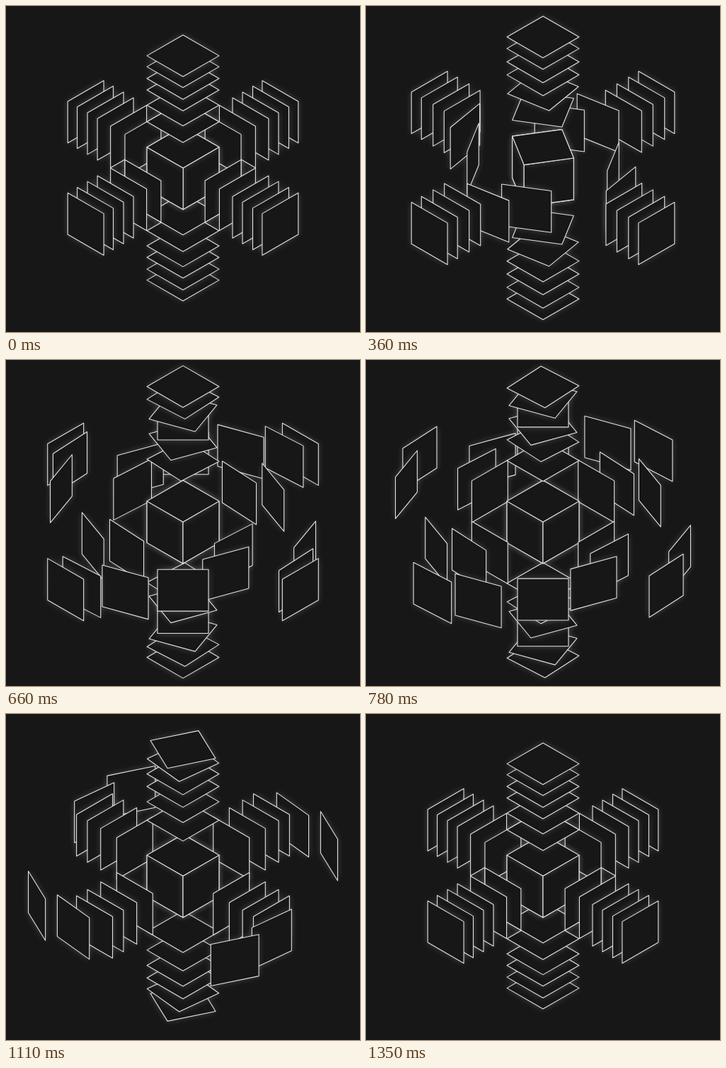
Recreate the animation shown at these times as an HTML page with a canvas. Size 500 px wide and 461 px high, loop 1380 ms.

```html
<!DOCTYPE html>
<html lang="en">
<head>
<meta charset="utf-8">
<title>Exploded cube</title>
<style>
  html, body { margin: 0; width: 100%; height: 100%; overflow: hidden; background: #171717; }
  canvas { display: block; }
</style>
</head>
<body>
<canvas id="stage" width="500" height="461"></canvas>
<script>
const ctx = document.getElementById('stage').getContext('2d');
const LOOP = 1380, STEP = 30;                // ms
const TURN = 630, STAGGER = 120;             // ms per quarter turn, delay per shell
const HALF = 36;                             // half the side of a panel
const CX = 250, CY = 229;
const TILT = Math.asin(1 / Math.sqrt(3));    // isometric view
const SIN = Math.sin(TILT), COS = Math.cos(TILT);
const CORNERS = [[-1, -1], [1, -1], [1, 1], [-1, 1]];

// Rest distance and outward travel of each shell, from the core out
const SHELLS = [
  [36, 0], [78.7, 28.1], [107.2, 33.6], [133.4, 34.1],
  [153.1, 37.3], [173.4, 40.9], [192.3, 42.2]
];

// x to the right, y up, z towards the viewer
const project = ([x, y, z]) => [CX + x, CY + z * SIN - y * COS];

function quarterTurn(t, i) {
  const p = Math.min(1, Math.max(0, (t - i * STAGGER) / TURN));
  return Math.PI / 4 * (1 - Math.cos(Math.PI * p));
}

const spread = t => 1 - Math.abs(1 - 2 * t / LOOP) ** 2.17;

// The panels of one shell: four sides, top and bottom
function shellPanels(dist, angle) {
  const panels = [];
  for (let k = 0; k < 4; k++) {
    const a = angle + Math.PI / 4 + k * Math.PI / 2;
    const s = Math.sin(a), c = Math.cos(a);
    if (Math.abs(c) < 0.005) continue;       // edge-on, invisible
    panels.push({
      front: c > 0,
      points: CORNERS.map(([u, v]) =>
        project([dist * s + u * HALF * c, v * HALF, dist * c - u * HALF * s]))
    });
  }
  const s = Math.sin(angle + Math.PI / 4), c = Math.cos(angle + Math.PI / 4);
  for (const side of [1, -1]) {
    panels.push({
      front: side > 0,
      points: CORNERS.map(([u, v]) =>
        project([HALF * (u * c + v * s), side * dist, HALF * (v * c - u * s)]))
    });
  }
  return panels;
}

function drawPanel({ points }) {
  ctx.beginPath();
  for (const [x, y] of points) ctx.lineTo(x, y);
  ctx.closePath();
  ctx.shadowColor = 'rgba(255,255,255,.2)';
  ctx.shadowBlur = 10;
  ctx.fill();
  ctx.shadowColor = 'transparent';
  ctx.stroke();
}

function draw(t) {
  ctx.fillStyle = '#171717';
  ctx.fillRect(0, 0, 500, 461);
  ctx.strokeStyle = '#e2e2e2';
  ctx.lineWidth = 1.1;
  ctx.lineJoin = 'round';
  const open = spread(t);
  const shells = SHELLS.map(([rest, travel], i) =>
    shellPanels(rest + travel * open, quarterTurn(t, i)));
  // Rear panels from the outside in, then front panels from the inside out
  for (const shell of [...shells].reverse()) shell.filter(p => !p.front).forEach(drawPanel);
  for (const shell of shells) shell.filter(p => p.front).forEach(drawPanel);
}

const start = performance.now();
function tick() {
  const t = (performance.now() - start) % LOOP;
  draw((Math.floor(t / STEP) + 0.5) * STEP);  // each step shows its middle
  requestAnimationFrame(tick);
}
tick();
</script>
</body>
</html>
```
